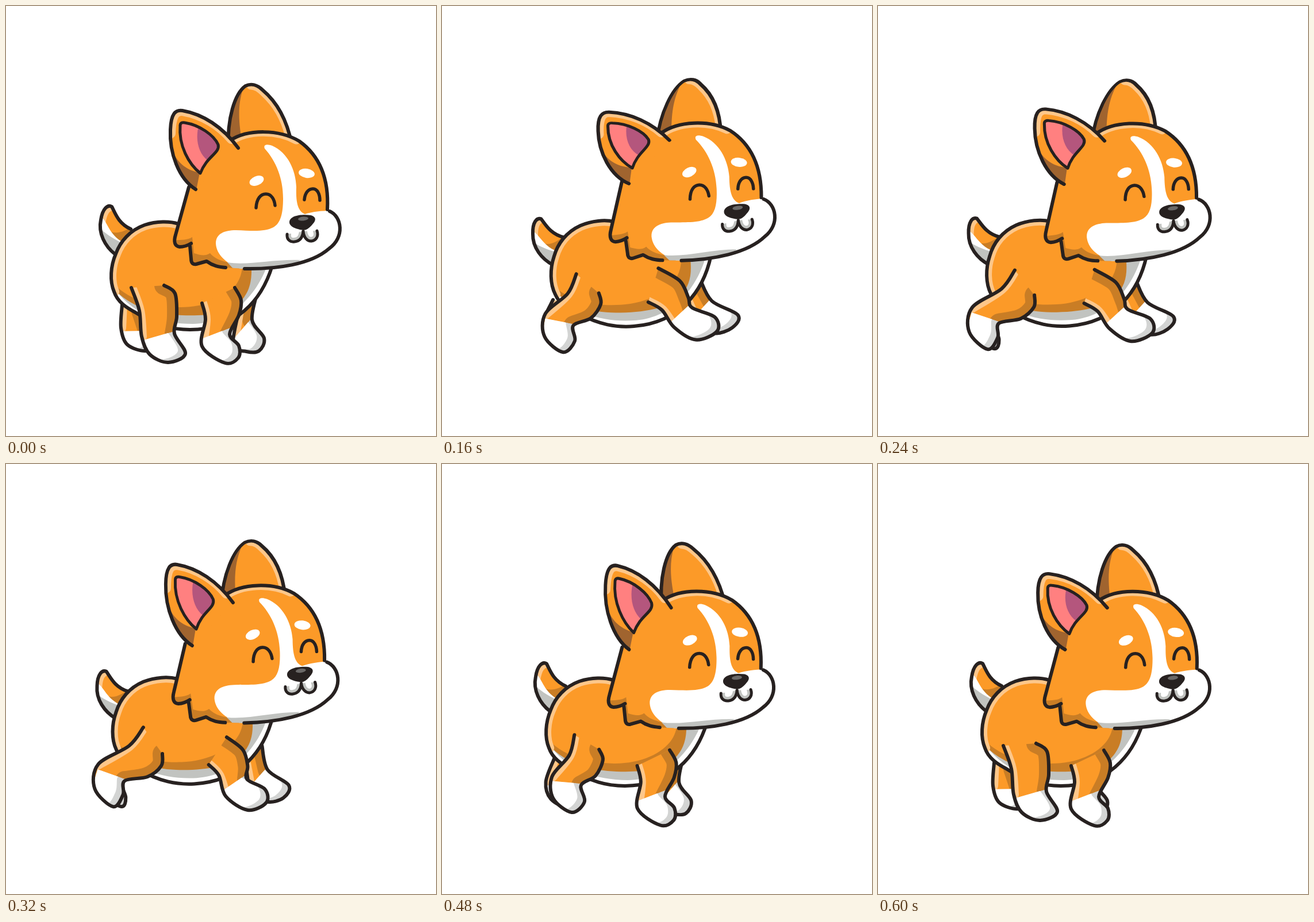
These frames come from a looping animation (748 by 748 pixels, 640 ms). An HTML page with a canvas:

```html
<!DOCTYPE html>
<html lang="en">
<head>
<meta charset="utf-8">
<title>Running puppy</title>
<style>
html, body { margin: 0; width: 100%; height: 100%; overflow: hidden; background: #fff; }
canvas { display: block; }
</style>
</head>
<body>
<canvas id="stage" width="748" height="748"></canvas>
<script>
const ctx = document.getElementById('stage').getContext('2d');
const INK = '#272120', ORANGE = '#fc9a28', LIGHT = '#fec78a', SHADE = '#c97d25',
  BROWN = '#a0642f', GREY = '#d3d4d3', MID = '#c1c3c0', WHITE = '#fff',
  PINK = '#ff8080', PLUM = '#b4567d';
const STEP = 40, STEPS = 16;

// Each leg blends from its standing outline to its stretched one.
// sock = first and last outline point of the white part and how far it reaches past them
const nearFront = {
  stand: [398,490, 409,512, 405,538, 389,571, 405,591, 404,612, 381,621, 341,592, 347,545, 341,517],
  stretch: [375,454, 414,476, 430,505, 438,522, 479,538, 483,563, 445,578, 408,557, 385,528, 360,515],
  sock: [3, 7, .4, .3], lit: [7, 10], dark: [0, 4]
};
const nearHind = {
  stand: [218,490, 232,530, 236,575, 250,606, 282,620, 312,605, 293,570, 297,540, 294,500, 275,486],
  stretch: [239,458, 214,490, 160,522, 154,565, 186,596, 203,575, 206,551, 246,544, 270,525, 272,504],
  sock: [3, 6, .8, .15], lit: [0, 3], dark: [6, 10]
};
const farFront = {
  stand: [438,495, 428,546, 449,578, 440,600, 418,601, 395,590, 405,530],
  stretch: [450,475, 472,511, 519,535, 509,557, 477,567, 446,546, 425,505],
  sock: [1, 5, .1, .2], lit: [5, 7], dark: [0, 2]
};
const farHind = {
  stand: [202,520, 200,560, 211,589, 243,600, 260,585, 245,560, 235,530],
  stretch: [190,508, 167,548, 174,578, 201,596, 208,580, 200,550, 220,515],
  sock: [2, 4, .8, .8], lit: [0, 2], dark: [5, 7]
};

const clamp = u => Math.min(Math.max(u, 0), 1);
const ease = u => (u = clamp(u), u * u * (3 - 2 * u));
const wave = (s, period) => Math.sin(2 * Math.PI * s / period);
const mix = (a, b, u) => a.map((v, i) => v + (b[i] - v) * u);
const pairs = row => row.filter((v, i) => i % 2 === 0).map((x, i) => [x, row[2 * i + 1]]);

// Smooth open curve through points
function curve(pts) {
  const path = new Path2D(), at = i => pts[Math.min(Math.max(i, 0), pts.length - 1)];
  path.moveTo(...pts[0]);
  for (let i = 0; i < pts.length - 1; i++) {
    const [a, b, c, d] = [at(i - 1), at(i), at(i + 1), at(i + 2)];
    path.bezierCurveTo(b[0] + (c[0] - a[0]) / 6, b[1] + (c[1] - a[1]) / 6,
      c[0] - (d[0] - b[0]) / 6, c[1] - (d[1] - b[1]) / 6, c[0], c[1]);
  }
  return path;
}

const asPath = p => typeof p === 'string' ? new Path2D(p) : p;
function fill(path, color) {
  ctx.fillStyle = color;
  ctx.fill(asPath(path));
}
function line(path, color = INK, width = 6) {
  ctx.strokeStyle = color;
  ctx.lineWidth = width;
  ctx.stroke(asPath(path));
}
function saved(draw) {
  ctx.save();
  draw();
  ctx.restore();
}
function within(path, draw) {
  saved(() => { ctx.clip(asPath(path)); draw(); });
}
function posed(px, py, x, y, turn, draw) {
  saved(() => {
    ctx.translate(px + x, py + y);
    ctx.rotate(turn);
    ctx.translate(-px, -py);
    draw();
  });
}
// Shear: points move by (dx, dy) times their distance along (nx, ny) from a fixed base
function bent(px, py, nx, ny, dx, dy, draw) {
  saved(() => {
    ctx.translate(px, py);
    ctx.transform(1 + dx * nx, dy * nx, dx * ny, 1 + dy * ny, 0, 0);
    ctx.translate(-px, -py);
    draw();
  });
}
function oval(x, y, rx, ry, turn, color) {
  const path = new Path2D();
  path.ellipse(x, y, rx, ry, turn, 0, 7);
  fill(path, color);
}

function leg({ stand, stretch, sock, lit, dark }, amount, dx = 0, dy = 0) {
  const pts = pairs(mix(stand, stretch, amount)).map(([x, y]) => [x + dx, y + dy]);
  const outline = curve(pts), [i, j, u, v] = sock;
  const paw = curve([mix(pts[i], pts[i - 1], u), ...pts.slice(i, j + 1), mix(pts[j], pts[j + 1], v)]);
  fill(outline, ORANGE);
  within(outline, () => {
    line(curve(pts.slice(...dark)), SHADE, 34);
    line(curve(pts.slice(...lit)), LIGHT, 18);
    within(paw, () => {
      fill(paw, GREY);
      ctx.translate(-13, -5);
      fill(paw, WHITE);
    });
  });
  line(outline);
}

const tailShape = 'M190 432C172 418 160 395 165 372C168 352 177 345 184 349C190 360 195 378 217 388';
function tail() {
  within(tailShape + 'L225 410Z', () => {
    fill('M150 340H230V440H150Z', ORANGE);
    line('M167 375C170 358 175 352 182 350', LIGHT, 13);
    fill('M177 390C192 399 204 392 222 384L216 415H195Z', SHADE);
    fill('M160 364C178 370 174 395 205 412L190 440L155 400Z', WHITE);
    fill('M160 384C175 398 190 407 208 415L190 445L150 400Z', MID);
  });
  line(tailShape);
}

const back = 'M300 379C285 374 262 374 241 381C216 390 199 409 191 431C182 452 180 478 188 497';
const bodyShape = back + 'C194 515 210 525 225 533C260 556 290 563 320 563C400 563 445 512 463 452';
function body() {
  within(bodyShape + 'L400 380Z', () => {
    fill('M170 360H480V570H170Z', WHITE);
    fill('M185 485C215 535 270 553 325 553C390 552 435 505 455 450H400L300 500Z', MID);
    fill('M170 470C200 515 240 532 290 537C340 541 380 536 402 520C424 500 428 480 427 450L400 370H170Z', SHADE);
    fill('M170 460C195 505 245 523 300 524C345 525 385 508 402 482C408 472 411 462 411 450L400 370H170Z', ORANGE);
    line(back, LIGHT, 18);
  });
  line(bodyShape);
}

const farEarShape = 'M387 250C384 195 398 152 416 139C426 134 437 137 446 146C470 166 488 195 497 240';
function farEar() {
  within(farEarShape, () => {
    fill(farEarShape, ORANGE);
    fill('M375 255C386 190 398 158 412 144C402 175 404 205 414 255Z', BROWN);
    line('M426 137C437 137 446 146 450 150C470 168 486 195 494 226', LIGHT, 17);
  });
  line(farEarShape);
}

const nearEarShape = 'M330 319C300 300 284 255 286 215C287 187 295 180 307 182C342 188 377 210 404 247';
const innerEar = 'M303 208C303 203 307 202 311 203C337 207 362 225 369 241C373 256 349 261 338 291C318 275 300 243 303 208Z';
function nearEar() {
  fill(nearEarShape, ORANGE);
  within(nearEarShape, () => {
    fill('M280 228C292 268 308 284 337 290L330 325L280 300Z', BROWN);
    line('M287 222C288 190 295 182 307 183C342 189 372 208 392 232', LIGHT, 16);
  });
  within(innerEar, () => {
    fill(innerEar, PINK);
    fill('M336 205C328 232 335 256 350 268L380 245Z', PLUM);
  });
  line(innerEar, INK, 5);
  line(nearEarShape);
}

const jaw = 'M318 315L295 398C291 411 294 418 302 419C311 419 317 416 322 413';
const ruff = 'M320 418L322 440C322 448 326 450 331 449L349 444C360 452 370 454 382 455';
const cheek = 'M415 457C470 458 530 450 562 422C590 402 584 366 563 357';
const crown = 'M559 354C562 300 545 260 510 235C475 214 420 214 390 234';
const headFill = [jaw, ruff, cheek, crown].join('').replace(/(?!^)M/g, 'L') + 'Z';
const muzzle = 'M365 413C365 396 380 390 400 390C430 391 450 393 465 385C478 378 482 360 482 335' +
  'C482 300 470 270 450 248C447 240 455 240 463 243C490 255 504 285 505 315C504 343 508 357 520 362' +
  'C532 358 550 356 565 356L600 380L560 445L410 458C382 448 366 432 365 413Z';
const eyes = ['M435 351C436 335 443 327 452 327C462 327 467 337 468 347',
  'M519 337C520 325 526 318 534 318C542 318 546 328 546 338'];
const lips = ['M489 397C488 406 494 411 502 410C512 409 516 402 517 392',
  'M517 392C518 403 524 409 531 409C540 408 544 400 541 391'];
const nose = 'M493 375C495 364 515 362 530 364C541 367 539 374 533 380C527 387 522 390 517 390C505 388 492 384 493 375Z';

function head(flap, tilt) {
  bent(440, 225, 0, -1, .23 * tilt, .08 * tilt, farEar);
  within(headFill, () => {
    fill(headFill, ORANGE);
    fill('M290 408C305 406 315 408 324 402L327 430C337 433 346 436 355 430C366 444 390 448 415 450V465H290Z', SHADE);
    fill(muzzle, WHITE);
    fill('M385 446C420 452 465 440 512 442C495 458 440 465 400 462Z', MID);
    line('M390 234C420 214 470 213 505 232', LIGHT, 17);
  });
  [jaw, ruff, cheek, crown].forEach(p => line(p));
  oval(436, 304, 13, 8, -.4, WHITE);
  oval(523, 291, 14, 8, .15, WHITE);
  eyes.forEach(p => line(p, INK, 5.5));
  lips.forEach(p => {
    within(p, () => line(p, MID, 14));
    line(p, INK, 5);
  });
  fill(nose, INK);
  oval(517, 370, 9, 3.5, -.1, '#6b6968');
  bent(404, 247, -.7, -.716, -.05 * flap, .1 * flap, nearEar);
}

function draw() {
  const s = Math.floor(performance.now() / STEP) % STEPS;
  const leap = s < 4.7 ? ease(s / 4.7) : ease((12.5 - s) / 7.8);
  const land = ease((s - 4.7) / 4);
  const kick = Math.sin(Math.PI * s / 15);
  const tuck = clamp((s - 8) / 7) ** 2;

  ctx.fillStyle = WHITE;
  ctx.fillRect(0, 0, 748, 748);
  ctx.lineCap = ctx.lineJoin = 'round';
  posed(190, 432, 4 * leap - 2 * land, 20 * leap - 2 * land, -.2 * leap, tail);
  leg(farHind, kick);
  leg(farFront, leap, -50 * tuck, 8 * land);
  posed(320, 470, 7 * leap - 2 * land, -6 * leap - 3 * land, -.085 * leap, body);
  leg(nearHind, kick);
  leg(nearFront, leap, -5 * tuck, 8 * land);
  posed(515, 376, -4 * ease(s / 7), 2 * land - 20 * leap, -.05 * leap - .01 * land,
    () => head(wave(s, 14), .43 + .57 * wave(s - 1.8, 14)));
  requestAnimationFrame(draw);
}
draw();
</script>
</body>
</html>
```
